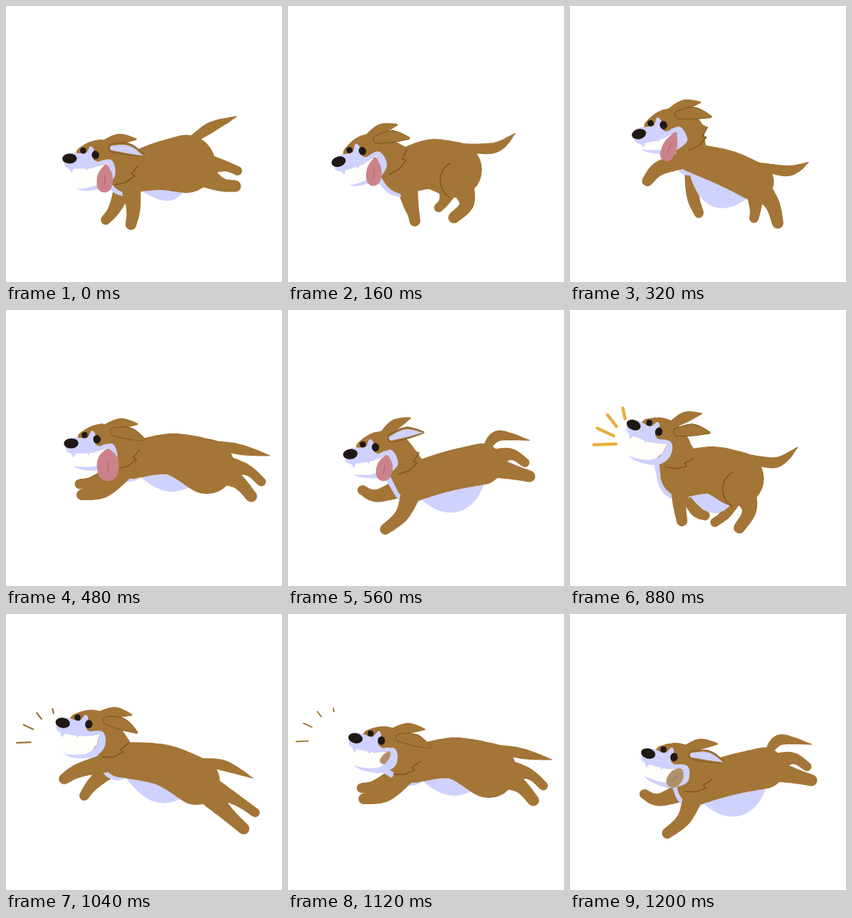
Write an HTML page with a canvas that moves like this. It is 360 px wide and 360 px high and loops after 1.28 s.

```html
<!DOCTYPE html>
<html lang="en">
<head>
<meta charset="utf-8">
<title>Running dog</title>
<style>
html, body { margin: 0; width: 100%; height: 100%; overflow: hidden; background: #fff; }
canvas { display: block; width: 100vw; height: 100vh; }
</style>
</head>
<body>
<canvas id="stage" width="360" height="360"></canvas>
<script>
const ctx = document.getElementById('stage').getContext('2d');
const FUR = '#a37536', PALE = '#cfd1ff', DARK = '#7b5320', BLACK = '#1f1814';
const PINK = '#cb8389', TAN = '#b0906a';

const mix = (a, b, t) => Array.isArray(a) ? a.map((v, i) => mix(v, b[i], t)) : a + (b - a) * t;
const add = (p, dx, dy, dr = 0) => [p[0] + dx, p[1] + dy, p[2] + dr];
function turn([x, y], deg, ox = 0, oy = 0) {
  const a = deg * Math.PI / 180, c = Math.cos(a), s = Math.sin(a);
  return [ox + (x - ox) * c - (y - oy) * s, oy + (x - ox) * s + (y - oy) * c];
}

// Body: chest, loin and hip circles, belly sag, knee and paw of each leg, middle and tip of the tail
const land = [[160, 219, 25], [200, 209, 31], [235, 206, 38], [212, 240, 14],
  [166, 262, 163, 285], [143, 262, 130, 279], [276, 231, 299, 235], [281, 208, 302, 215], [268, 158, 301, 144]];
const tuck = [[155, 218, 28], [188, 204, 34], [216, 207, 37], [188, 205, 5],
  [178, 258, 185, 286], [156, 262, 154, 279], [233, 252, 212, 268], [206, 240, 204, 249], [270, 171, 296, 153]];
const gather = [[148, 214, 30], [185, 209, 31], [217, 220, 36], [188, 249, 16],
  [143, 250, 146, 275], [163, 259, 176, 268], [234, 258, 221, 284], [205, 262, 189, 277], [268, 199, 297, 179]];
const push = [[160, 198, 19], [205, 212, 24], [241, 229, 25], [195, 239, 24],
  [118, 211, 101, 228], [160, 245, 168, 270], [263, 257, 271, 283], [242, 262, 240, 277], [285, 215, 311, 204]];
const leap = [[150, 190, 23], [205, 197, 27], [248, 218, 31], [200, 226, 20],
  [98, 203, 76, 215], [115, 220, 102, 237], [285, 257, 310, 280], [296, 240, 325, 259], [285, 198, 322, 214]];
const fly = [[165, 196, 24], [215, 188, 27], [262, 204, 36], [215, 218, 19],
  [130, 234, 99, 241], [118, 223, 96, 227], [300, 222, 320, 243], [310, 207, 333, 224], [305, 182, 344, 190]];
const reach = [[165, 224, 25], [210, 210, 26], [253, 201, 27], [215, 236, 28],
  [150, 265, 127, 286], [118, 242, 97, 235], [292, 211, 315, 217], [288, 188, 309, 199], [275, 164, 315, 170]];
const gallop = [land, tuck, mix(tuck, gather, .5), gather, push, leap, fly, reach];

// Head at a step: nose x, y, tilt, jaw closing, ear lift, ear lining, tongue tip x, y and width
const headKeys = [
  [0, [83, 199, -8, 0, 2, 1, 38, 50, 22]],
  [2, [66, 203, -24, 8, 2, 0, 28, 47, 21]],
  [4, [90, 167, -20, 24, 0, 0, 19, 44, 20]],
  [6, [85, 174, -9, 13, 0, 0, 40, 56, 30]],
  [9, [74, 216, -28, 21, 56, 2, 12, 22, 7]],
  [11, [83, 150, 15, 0, 38, 0, 40, 20, 0]],
  [13, [74, 142, 3, 0, 5, 0, 40, 20, 0]],
  [15, [102, 182, 8, 13, 19, 1, 33, 39, 20]]
];
function headAt(step) {
  const i = headKeys.findLastIndex(k => k[0] <= step);
  const [from, a] = headKeys[i], [to, b] = headKeys[i + 1] || [from + 1, a];
  return mix(a, b, (step - from) / (to - from));
}

function spline(a, b, c, d, t) {
  return b + .5 * t * (c - a + t * (2 * a - 5 * b + 4 * c - d + t * (3 * (b - c) + d - a)));
}
// Sweeps a circle along a smooth path of [x, y, radius]
function limb(p, color) {
  const at = i => p[Math.max(0, Math.min(p.length - 1, i))], N = 30;
  ctx.beginPath();
  for (let k = 0; k <= (p.length - 1) * N; k++) {
    const i = Math.floor(k / N), t = k / N - i;
    const [x, y, r] = [0, 1, 2].map(j => spline(at(i - 1)[j], at(i)[j], at(i + 1)[j], at(i + 2)[j], t));
    ctx.moveTo(x, y);
    ctx.arc(x, y, Math.max(r, .5), 0, 7);
  }
  ctx.fillStyle = color;
  ctx.fill();
}
// Closed smooth outline; a doubled point makes a corner
function blob(p, color) {
  const n = p.length, at = i => p[(i + n) % n];
  ctx.beginPath();
  ctx.moveTo(...p[0]);
  for (let i = 0; i < n; i++) {
    const [a, b, c, d] = [at(i - 1), at(i), at(i + 1), at(i + 2)];
    ctx.bezierCurveTo(b[0] + (c[0] - a[0]) / 6, b[1] + (c[1] - a[1]) / 6,
      c[0] - (d[0] - b[0]) / 6, c[1] - (d[1] - b[1]) / 6, ...c);
  }
  ctx.fillStyle = color;
  ctx.fill();
}
function poly(p, color) {
  ctx.beginPath();
  p.forEach(q => ctx.lineTo(...q));
  ctx.fillStyle = color;
  ctx.fill();
}
function line(p, color = DARK, width = 1.3) {
  ctx.beginPath();
  p.forEach(q => ctx.lineTo(...q));
  ctx.strokeStyle = color;
  ctx.lineWidth = width;
  ctx.stroke();
}
function oval(x, y, rx, ry, tilt = 0) {
  ctx.beginPath();
  ctx.ellipse(x, y, rx, ry, tilt, 0, 7);
  ctx.fillStyle = BLACK;
  ctx.fill();
}

function leg([x, y, r], [kx, ky, px, py], width) {
  limb([[x, y, r * .6], [kx, ky, width], [px, py, width * .75]], FUR);
}

function drawBody([chest, loin, hip, belly, nearFore, farFore, nearHind, farHind, tail], [x, y, tilt]) {
  const [nx, ny] = turn([60, 18], tilt), nape = [x + nx, y + ny, 22];
  limb([add(hip, 6, -.8 * hip[2], 5 - hip[2]), [tail[0], tail[1], 7], [tail[2], tail[3], .6]], FUR);
  leg(hip, farHind, 8);
  leg(chest, farFore, 8.5);
  limb([add(nape, -7, 5), add(chest, -5, 5, -1)], PALE);
  limb([[...chest.slice(0, 2), 10], belly, [...hip.slice(0, 2), 10]], PALE);
  limb([chest, loin, hip], FUR);
  limb([nape, chest], FUR);
  leg(hip, nearHind, 10);
  leg(chest, nearFore, 9.5);
  if (nearHind[2] < hip[0] + 10) {          // folded thigh
    ctx.beginPath();
    ctx.arc(hip[0] + 8, hip[1] + 14, 26, 2.1, 4.2);
    ctx.strokeStyle = DARK;
    ctx.lineWidth = 1.3;
    ctx.stroke();
  }
}

// Head space: nose at 0,0 and near eye at 34,0
const MUZZLE = [[-8, 6], [-4, -5], [6, -7], [14, -5], [22, -4], [29, -12], [33, -7], [30, 3],
  [35, 9], [44, 8], [53, 9], [57, 18], [55, 31]];
const JAW = [[44, 42], [28, 45], [12, 44], [3, 40], [3, 40], [12, 41], [26, 40], [38, 36], [46, 26]];
const LIP = [[49, 12], [49, 12], [41, 14], [26, 16], [11, 15], [-4, 12]];

function ear(x, y, rest, lift, lined, edge) {
  const at = (d, side) => turn([x + d, y + side], rest - lift, x, y);
  const shape = grow => [[...at(0, 0), 5 + grow], [...at(20, -3), 7 + grow], [...at(41, 0), 1.2 + grow / 2]];
  if (edge) limb(shape(.9), DARK);
  limb(shape(0), FUR);
  if (lined) limb(shape(-2).map(p => add(p, -1, 0)), PALE);
}

function drawHead([x, y, tilt, shut, lift, lining, tx, ty, width], tongue) {
  ctx.save();
  ctx.translate(x, y);
  ctx.rotate(tilt * Math.PI / 180);
  ear(48, -13, 2, lift, lining > 1.5);
  limb([[18, -4, 9], [40, 3, 22], [60, 13, 20]], FUR);
  const ruff = [[87, 22], [77, 31], [81, 34], [68, 41], [54, 42]];
  poly([[72, -3], [79, 13], ...ruff], FUR);
  line(ruff);

  const jaw = JAW.map(p => turn(p, shut, 49, 13));
  poly([...LIP, ...jaw.slice(4)], '#fffefa');
  blob([...MUZZLE, ...jaw, ...LIP], PALE);
  for (const fx of [0, 20]) poly([[fx - 3, 12], [fx, 19], [fx + 4, 13]], PALE);
  if (width > 2) {
    const r = width * .45, root = [46, 14], len = Math.hypot(tx - 46, ty - 14);
    const along = (d, size) => [...mix(root, [tx, ty], d), size];
    const end = 1 - r / len;
    limb([along(.05, 2), along(end * .6, r), along(end, r)], tongue);
    if (width > 12) line([along(.4, 0), along(.72, 0)], 'rgba(110,50,55,.4)', 1);
  }
  oval(0, 0, 9.5, 6.6, .12);
  oval(19, -8, 4, 4);
  oval(34, 0, 4.8, 5.5);
  ear(58, -6, 24, lift, lining > .5, true);
  ctx.restore();
}

// Bark marks fan out from the mouth, shrink and darken
function drawMarks(step) {
  if (step < 11 || step > 14) return;
  const t = Math.min((step - 11) / 2, 1.2), shade = mix([232, 174, 58], [156, 109, 44], Math.min(t, 1));
  for (let i = 0; i < 4; i++) {
    const near = mix(18 + 5 * i, 37, t), far = near + mix(29 - 5 * i, 18 - 4 * i, t);
    const ray = d => turn([78 - 9 * t + d, 174 - 8 * t], 178 + 27 * i, 78 - 9 * t, 174 - 8 * t);
    line([ray(near), ray(far)], `rgb(${shade})`, 4 - 2 * t);
  }
}

function frame(now) {
  const step = Math.floor(now % 1280 / 80), head = headAt(step);
  ctx.fillStyle = '#fff';
  ctx.fillRect(0, 0, 360, 360);
  drawBody(gallop[step % 8], head);
  drawHead(head, step < 8 ? PINK : TAN);
  drawMarks(step);
  requestAnimationFrame(frame);
}
ctx.lineCap = ctx.lineJoin = 'round';
requestAnimationFrame(frame);
</script>
</body>
</html>
```
